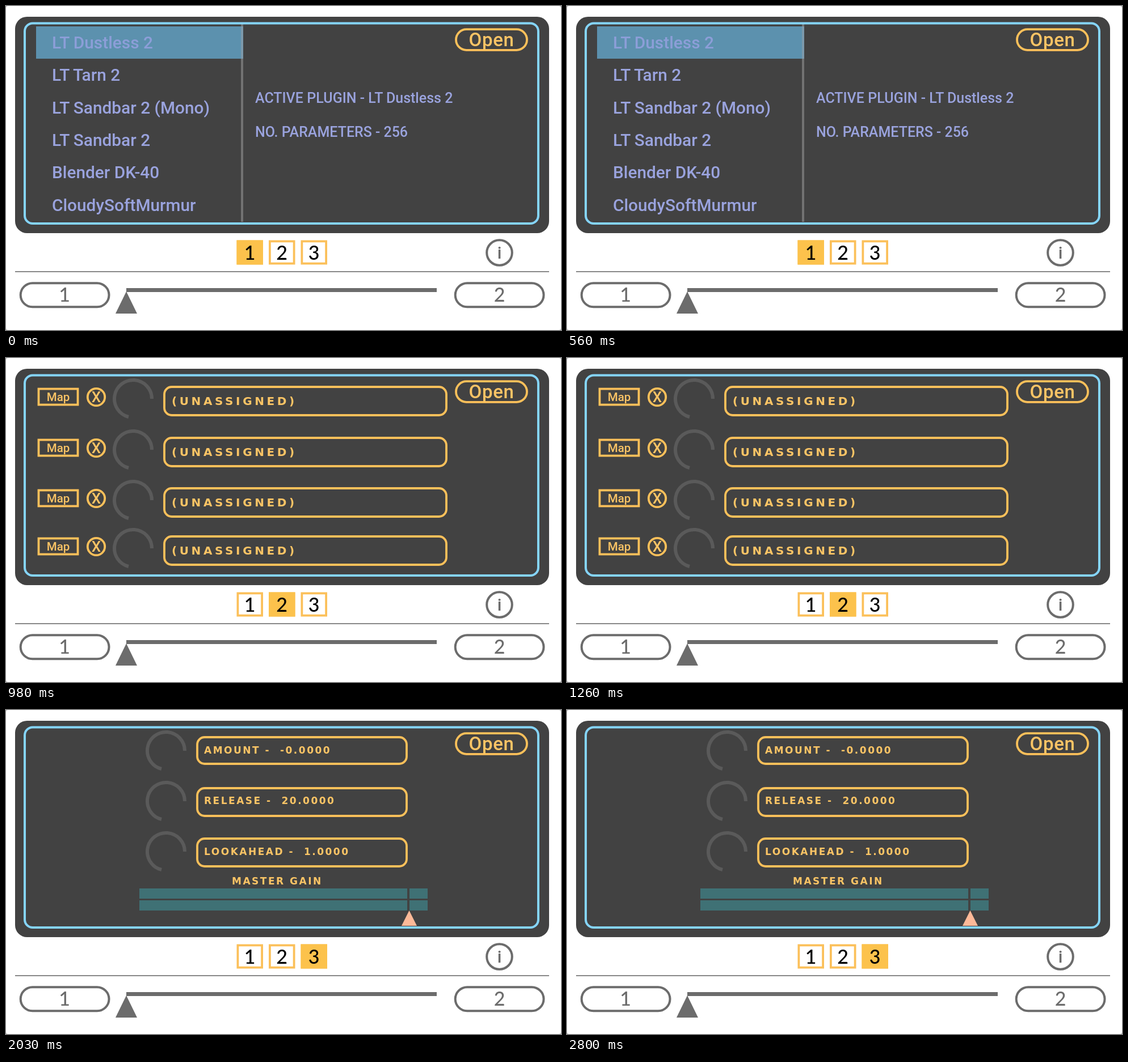
Recreate the animation shown at these times as an HTML page. Size 978 px wide and 572 px high, loop 2.87 s.

```html
<!DOCTYPE html>
<html lang="en">
<head>
<meta charset="utf-8">
<title>Plugin panel</title>
<style>
  html, body { margin: 0; width: 100%; height: 100%; overflow: hidden; background: #c4c4c4; }
  svg { display: block; width: 978px; height: 572px; }
  text { font-family: Roboto, sans-serif; font-weight: 500; }
  .digit { font-family: Lato, sans-serif; font-size: 34px; text-anchor: middle; }
  .list { font-size: 29.8px; fill: #9aa3de; }
  .info { font-size: 25px; fill: #9aa3de; }
  .caps { font: bold 17px "DejaVu Sans", sans-serif; letter-spacing: 2.5px; fill: #fbc465; white-space: pre; }
  .wide { font-size: 20px; letter-spacing: 4.6px; }
  .mid { text-anchor: middle; }
  .gold { fill: none; stroke: #fbc05a; stroke-width: 3.8; }
  .goldText { fill: #fbc465; }
  .grey { fill: none; stroke: #6c6c6c; stroke-width: 4; }
  .greyFill { fill: #6c6c6c; }
  .knob { fill: none; stroke: #5a5a5a; stroke-width: 6; }
  .on { fill: #fcc24c; }

  .page { visibility: hidden; animation: 2870ms step-end infinite; }
  #p1 { animation-name: first; }
  #p2 { animation-name: second; }
  #p3 { animation-name: third; }
  /* Pages switch at 980 ms and 1960 ms */
  @keyframes first  { 0% { visibility: visible; } 34.146%, 100% { visibility: hidden; } }
  @keyframes second { 0% { visibility: hidden; } 34.146% { visibility: visible; } 68.292%, 100% { visibility: hidden; } }
  @keyframes third  { 0% { visibility: hidden; } 68.292%, 100% { visibility: visible; } }
</style>
</head>
<body>
<svg viewBox="0 0 978 572">
  <rect width="978" height="572" rx="4" fill="#fff"/>
  <rect x="16" y="19" width="941" height="382" rx="21" fill="#424242"/>

  <g id="tabs" class="gold"></g>

  <g id="p1" class="page">
    <rect x="53" y="36" width="364" height="57" fill="#5c91ae"/>
    <rect x="414" y="32" width="4" height="349" fill="#727272"/>
    <rect x="414" y="36" width="4" height="57" fill="#7c99ab"/>
    <text class="info" x="439" y="171">ACTIVE PLUGIN - LT Dustless 2</text>
    <text class="info" x="439" y="231">NO. PARAMETERS - 256</text>
    <rect class="on" x="406.5" y="413.5" width="46.5" height="43"/>
  </g>

  <g id="p2" class="page">
    <rect class="on" x="463" y="413.5" width="46.5" height="43"/>
  </g>

  <g id="p3" class="page">
    <text class="caps" x="398" y="308">MASTER GAIN</text>
    <path fill="#3f7175" d="M235 315H707V333H235ZM711 315H743V333H711ZM235 336H707V354H235ZM711 336H743V354H711Z"/>
    <path fill="#fdb998" d="M710.5 354L724 381H697Z"/>
    <rect class="on" x="519.5" y="413.5" width="46.5" height="43"/>
  </g>

  <rect x="33" y="30.5" width="905" height="353.5" rx="14" fill="none" stroke="#85d5fb" stroke-width="4"/>
  <rect class="gold" x="793" y="41.2" width="125" height="36.6" rx="18.3"/>
  <text class="goldText mid" x="855.5" y="71" font-size="33" letter-spacing="0.6">Open</text>

  <g id="digits"></g>

  <circle class="grey" cx="869.5" cy="435.5" r="22.3"/>
  <text class="greyFill mid" x="869.5" y="446" font-size="30">i</text>
  <rect class="greyFill" x="16" y="468.2" width="941" height="1.6"/>
  <rect class="grey" x="25.7" y="489.2" width="155.8" height="42" rx="21"/>
  <rect class="grey" x="791.7" y="489.2" width="155.8" height="42" rx="21"/>
  <text class="digit greyFill" x="103" y="522">1</text>
  <text class="digit greyFill" x="869.5" y="522">2</text>
  <rect class="greyFill" x="212" y="498" width="547" height="7"/>
  <path class="greyFill" d="M212 504L231 543H193Z"/>
</svg>
<script>
  const add = (id, markup) =>
    document.getElementById(id).insertAdjacentHTML('beforeend', markup);

  const knob = (x, y) =>
    `<path class="knob" d="M${x + 33} ${y}A33 33 0 1 0 ${x - 8} ${y + 32}"/>`;

  const box = (x, y, w, h) =>
    `<rect class="gold" x="${x + 2}" y="${y + 2}" width="${w - 4}" height="${h - 4}" rx="13"/>`;

  ['LT Dustless 2', 'LT Tarn 2', 'LT Sandbar 2 (Mono)', 'LT Sandbar 2',
   'Blender DK-40', 'CloudySoftMurmur'].forEach((name, i) => {
    const tint = i ? '' : ' style="fill:#8c9ed8"';
    add('p1', `<text class="list" x="81" y="${75 + i * 57.3}"${tint}>${name}</text>`);
  });

  [49, 139, 228, 313].forEach(y => add('p2',
    `<rect class="gold" x="57.5" y="${y + 5.5}" width="69" height="28"/>
     <text class="goldText mid" x="92" y="${y + 27}" font-size="20.5">Map</text>
     <circle class="gold" cx="159" cy="${y + 20}" r="15.2"/>
     <text class="goldText mid" x="159" y="${y + 29}" font-size="26">X</text>
     ${knob(224, y + 23)}${box(277, y, 501, 54)}
     <text class="caps wide" x="292" y="${y + 34}">(UNASSIGNED)</text>`));

  [['AMOUNT -  -0.0000', 46, 51, 77],
   ['RELEASE -  20.0000', 136, 53, 166],
   ['LOOKAHEAD -  1.0000', 225, 53, 255.5]].forEach(([label, y, h, base], i) => add('p3',
    `${knob(282, 72 + i * 89)}${box(335, y, 373, h)}
     <text class="caps" x="349" y="${base}">${label}</text>`));

  [1, 2, 3].forEach(n => {
    const x = 350 + n * 56.5;
    add('tabs', `<rect x="${x + 1.9}" y="415.4" width="42.7" height="39.2"/>`);
    add('digits', `<text class="digit" x="${x + 23.2}" y="448">${n}</text>`);
  });
</script>
</body>
</html>
```
